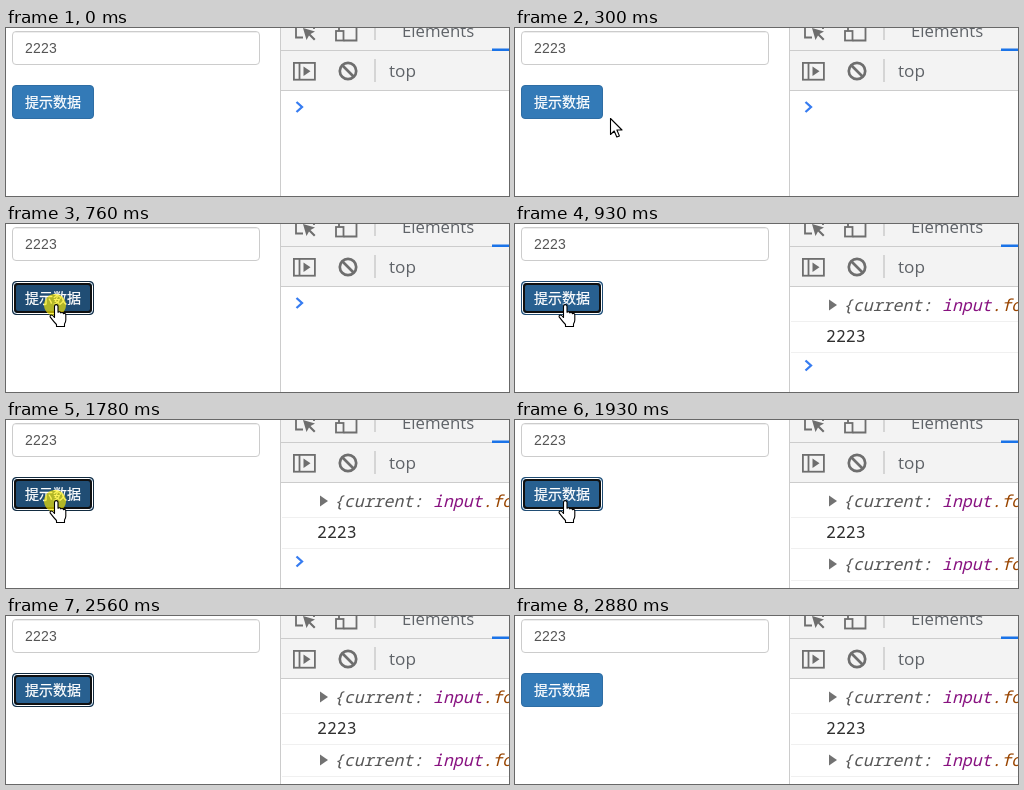
These frames come from a looping animation (503x168 px, 2.95 s). An HTML page:

```html
<!DOCTYPE html>
<html lang="zh">
<head>
<meta charset="utf-8">
<title>Button and console</title>
<style>
html, body { margin: 0; width: 100%; height: 100%; overflow: hidden; background: #fff; }
svg { display: block; width: 503px; height: 168px; }
.ui { font: 16.8px "Open Sans", "Noto Sans", sans-serif; fill: #5f6368; }
.mono { font: 16.5px "Noto Sans Mono", "DejaVu Sans Mono", monospace; fill: #303030; white-space: pre; }
.obj { font-style: italic; fill: #565656; }
.field { font: 14px "Liberation Sans", Arial, sans-serif; letter-spacing: .2px; fill: #555; }
.label { font: 14px "Noto Sans CJK SC", "Noto Sans CJK", "Noto Sans CJK JP", sans-serif; fill: #fff; stroke: #fff; stroke-width: .25; }
.icon { fill: none; stroke: #6e6e6e; stroke-width: 1.8; }
.solid { fill: #6e6e6e; }
.row { stroke: #f0f0f0; }
.cursor { fill: #fff; stroke: #000; stroke-width: 1.1; stroke-linejoin: round; }
</style>
</head>
<body>
<svg viewBox="0 0 503 168">
  <defs>
    <g id="entry">
      <path d="M314 75.500v11l8-5.500z" fill="#727272"/>
      <text class="mono obj" x="328" y="87">{current: <tspan fill="#881280">input</tspan><tspan fill="#994500">.form-control</tspan>}</text>
      <path class="row" d="M276 97.500H503"/>
    </g>
  </defs>

  <rect x="6.500" y="3.500" width="247" height="33" rx="3.500" fill="#fff" stroke="#ccc"/>
  <path d="M9 4.500H251" stroke="#eee"/>
  <text class="field" x="19" y="25">2223</text>

  <rect id="button" x="6.500" y="57.500" width="81" height="33" rx="3.500"/>
  <g id="ring" fill="none">
    <rect x="7.500" y="58.500" width="79" height="31" rx="3.500" stroke="#fff"/>
    <rect x="9" y="60" width="76" height="28" rx="3" stroke="#101010" stroke-width="2"/>
  </g>
  <text class="label" x="19" y="79">提示数据</text>

  <rect x="275" width="228" height="62" fill="#f3f3f3"/>
  <path d="M275 22.500H503M275 62.500H503M274.500 0V168" stroke="#ccc"/>
  <path d="M369 0V12M369 31V54" stroke="#ccc" stroke-width="1.500"/>
  <rect x="486" y="20.500" width="17" height="2.500" fill="#1a73e8"/>

  <path class="icon" d="M290 0V9.500H297M308 0V1"/>
  <path class="solid" d="M297 0l12 3.500-4.500 2.500 5 5-1.500 1.500-5-5-2.500 4.500z"/>
  <rect class="icon" x="330" y="3" width="7.500" height="9.500"/>
  <path class="icon" d="M333 3V-1M337.500 12.500H350.500V-1"/>
  <text class="ui" x="396" y="9">Elements</text>

  <rect class="icon" x="287.900" y="34.900" width="21" height="16.800"/>
  <path class="icon" d="M293.500 35V51.500"/>
  <path class="solid" d="M297.500 38.500v9.500l7-4.750z"/>
  <circle class="icon" cx="342" cy="43" r="8.200" style="stroke-width:2.700"/>
  <path class="icon" d="M336 37l12 12" style="stroke-width:2.700"/>
  <text class="ui" x="383" y="49" style="font-size:17.200px">top</text>

  <g id="first">
    <use href="#entry"/>
    <text class="mono" x="311" y="118">2223</text>
    <path class="row" d="M276 128.500H503"/>
  </g>
  <use id="second" href="#entry" y="63"/>
  <path id="prompt" d="M290.500 74l5.500 5-5.500 5" fill="none" stroke="#367cf1" stroke-width="2.300"/>

  <circle id="click" cx="49" cy="81" r="11" fill="#fe0" opacity=".65"/>
  <path id="arrow" class="cursor" d="M.5.5V16.500L4.200 13l2.600 6 2.600-1.100L6.900 12H12z"/>
  <path id="hand" class="cursor" d="M5.500 13.500V2.400a1.750 1.750 0 0 1 3.500 0V8.300a1.600 1.600 0 0 1 2.800 .7 1.500 1.500 0 0 1 2.600 .8 1.400 1.400 0 0 1 2.400 1v5.200q0 2-1.300 4V22.500H7.500V20.500Q4.500 17.500 1.300 13.200q-.7-1.500 .7-2.100 1.500-.3 3.500 2.400z"/>
</svg>
<script>
const LOOP = 2950;
const $ = id => document.getElementById(id);

// [start ms, cursor, x, y]
const pointer = [
  [0, "none", 0, 0],
  [70, "arrow", 304, 155],
  [150, "arrow", 224, 134],
  [220, "arrow", 150, 110],
  [300, "arrow", 95, 90],
  [370, "hand", 66, 84],
  [450, "hand", 52, 81],
  [530, "hand", 44, 80],
  [610, "hand", 43, 80],
  [2250, "hand", 84, 79],
  [2330, "arrow", 165, 102],
  [2410, "arrow", 310, 128],
  [2480, "arrow", 490, 156],
  [2560, "none", 0, 0]
];

// [start ms, button state]
const phases = [
  [0, "idle"], [370, "hover"], [760, "press"], [930, "hoverFocus"],
  [1780, "press"], [1930, "hoverFocus"], [2250, "focus"], [2880, "idle"]
];

// fill, border, focus ring
const looks = {
  idle: ["#337ab7", "#2e6da4", false],
  hover: ["#286090", "#204d74", false],
  press: ["#204d74", "#122b40", true],
  hoverFocus: ["#286090", "#204d74", true],
  focus: ["#286090", "#122b40", true]
};

const at = (steps, t) => steps.findLast(step => step[0] <= t);
const show = (id, on) => $(id).style.display = on ? "" : "none";

function draw(t) {
  const [, kind, x, y] = at(pointer, t);
  for (const id of ["arrow", "hand"]) {
    show(id, id === kind);
    $(id).setAttribute("transform", `translate(${x} ${y})`);
  }

  const state = at(phases, t)[1];
  const [fill, border, ring] = looks[state];
  $("button").setAttribute("fill", fill);
  $("button").setAttribute("stroke", border);
  show("ring", ring);
  show("click", state === "press");

  show("first", t >= 930);
  show("second", t >= 1930);
  show("prompt", t < 1930);
  $("prompt").setAttribute("transform", `translate(0 ${t < 930 ? 0 : 62.5})`);
}

const start = performance.now();
function tick() {
  draw((performance.now() - start) % LOOP);
  requestAnimationFrame(tick);
}
tick();
</script>
</body>
</html>
```
